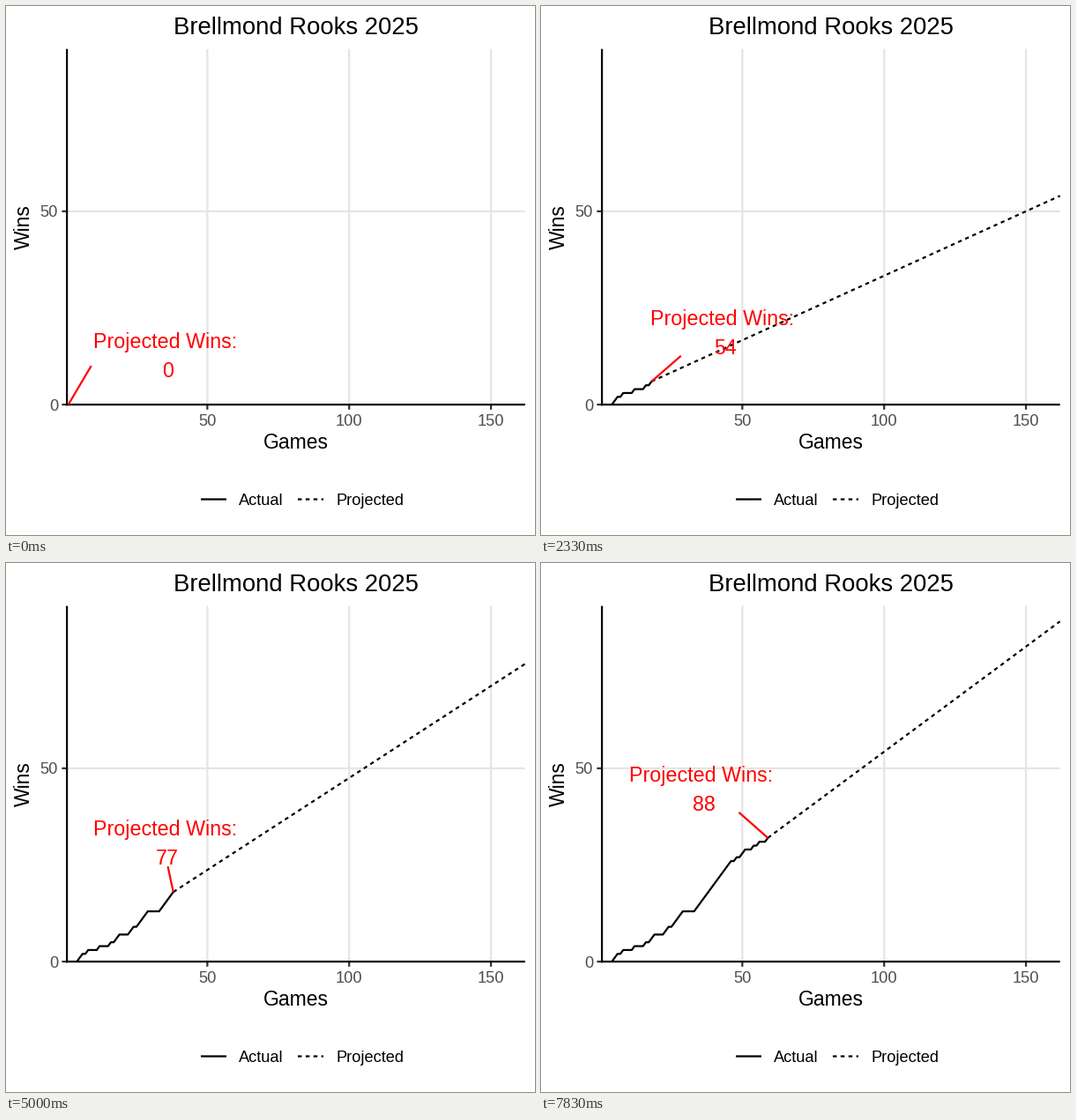
A matplotlib script that plays this animation: 600x600 px, repeating every 8 s.

```python
import math

import matplotlib.pyplot as plt
import numpy as np
from matplotlib.animation import FuncAnimation
from matplotlib.patches import Rectangle

SIZE, DPI = 600, 100
PT = 72 / DPI  # points per pixel
LINE = 2.22 * PT
LOOP, TICK = 8000, 40  # ms
FPS = 6  # games advance at this rate
SEASON = 162
LEFT, TOP, RIGHT, BOTTOM = 69.1, 48.7, 588.7, 452.1

# Corners of the cumulative win curve
GAMES = [1, 4, 6, 7, 8, 11, 12, 15, 16, 17, 19, 22, 24, 25, 29, 33,
         46, 47, 48, 49, 51, 53, 54, 55, 56, 58, 59]
WINS = [0, 0, 2, 2, 3, 3, 4, 4, 5, 5, 7, 7, 9, 9, 13, 13,
        26, 26, 27, 27, 29, 29, 30, 30, 31, 31, 32]

# Left edge of the label over the steps
LABEL_STEPS = [0, 9, 19, 26, 27, 35, 42, 47]
LABEL_X = [100, 117, 134, 163, 100, 99, 99.5, 101]

plt.rcParams["font.family"] = "Liberation Sans"
fig = plt.figure(figsize=(SIZE / DPI, SIZE / DPI), dpi=DPI, facecolor="white")
ax = fig.add_axes([0, 0, 1, 1])
ax.set(xlim=(0, SIZE), ylim=(SIZE, 0))
ax.axis("off")


def px(game):
    return 67.5 + 3.217 * game


def py(wins):
    return BOTTOM - 4.385 * wins


def text(x, y, s, size, color="black", ha="center", **kw):
    return ax.text(x, y, s, fontsize=size * PT, color=color, ha=ha,
                   va="baseline", **kw)


def line(xs, ys, color="black", z=2, **kw):
    return ax.plot(xs, ys, color=color, lw=LINE, zorder=z, snap=False,
                   solid_capstyle="butt", dash_capstyle="butt", **kw)[0]


def draw_chart():
    for g in (50, 100, 150):
        x = px(g)
        line([x, x], [TOP, BOTTOM], "#E5E5E5", 1)
        line([x, x], [BOTTOM, BOTTOM + 5.7], "#333333", 4)
        text(x, 476, str(g), 18.3, "#4D4D4D")
    for w in (0, 50):
        y = py(w)
        line([LEFT - 5.7, LEFT], [y, y], "#333333", 4)
        text(59, y + 6.5, str(w), 18.3, "#4D4D4D", "right")
    line([LEFT, RIGHT], [py(50)] * 2, "#E5E5E5", 1)
    line([LEFT, LEFT], [TOP, BOTTOM + 1.1], z=5)
    line([LEFT - 1.1, RIGHT], [BOTTOM, BOTTOM], z=5)

    text(329, 32.3, "Brellmond Rooks 2025", 27.5)
    text(329, 502, "Games", 22.9)
    text(27, 250.5, "Wins", 22.9, rotation=90, rotation_mode="anchor")

    line([221, 250], [559.5, 559.5])
    line([331, 360], [559.5, 559.5], ls=(0, (2, 2)))
    text(264.3, 566, "Actual", 18.3, ha="left")
    text(374, 566, "Projected", 18.3, ha="left")


draw_chart()
panel = Rectangle((LEFT, TOP), RIGHT - LEFT, BOTTOM - TOP, transform=ax.transData)
actual = line([], [])
projected = line([], [], ls=(0, (2, 2)))
for curve in (actual, projected):
    curve.set_clip_path(panel)
leader = line([], [], "red", 6)
caption = text(0, 0, "Projected Wins:", 23.2, "red", "left", zorder=7)
count = text(0, 0, "", 23.2, "red", zorder=7)


def leader_end(x, y, left):
    """Point where the leader meets the label box."""
    edge = left - 3.3
    if edge > x:
        return edge, y - 44
    return x + 34 * math.tanh((left + 83.5 - x) / 36), y - 29


def update(i):
    step = int((i + 0.9) * TICK * FPS / 1000)
    game = int(1.35 + 1.2385 * step)
    played = np.arange(1, game + 1)
    wins = np.interp(played, GAMES, WINS)
    total = round(wins[-1] / game * SEASON)
    x, y = px(game), py(wins[-1])
    left = np.interp(step, LABEL_STEPS, LABEL_X)
    end_x, end_y = leader_end(x, y, left)

    actual.set_data(px(played), py(wins))
    projected.set_data([x, px(SEASON)], [y, py(total)])
    leader.set_data([x, end_x], [y, end_y])
    caption.set_position((left - 1, y - 64))
    count.set_position((left + 83.5, y - 31))
    count.set_text(str(total))
    return actual, projected, leader, caption, count


anim = FuncAnimation(fig, update, frames=LOOP // TICK, interval=TICK,
                     repeat=True, repeat_delay=0, blit=False)
plt.show()
```
